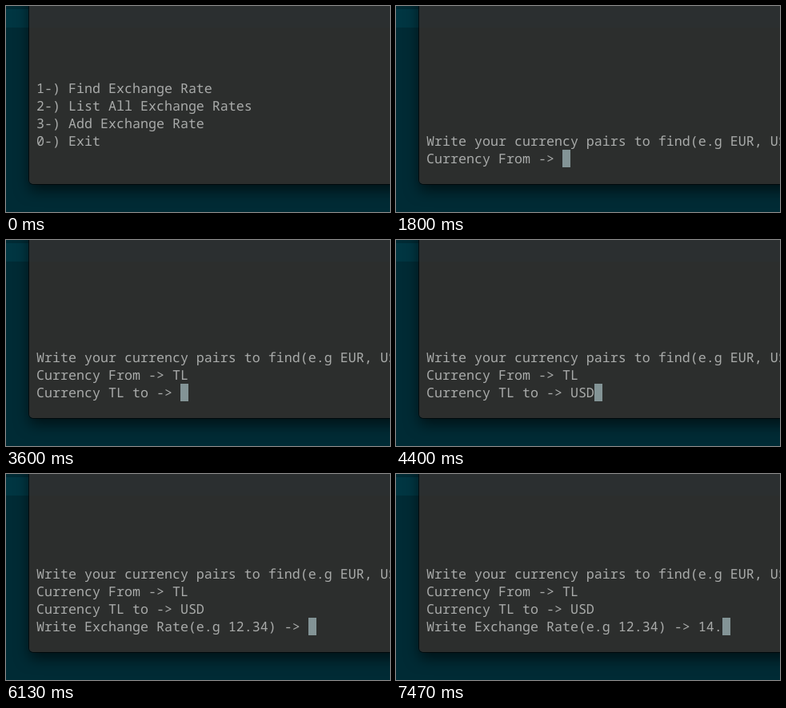
An HTML page that plays this animation: 480x258 px, repeating every 8 s.

```html
<!DOCTYPE html>
<html lang="en">
<head>
<meta charset="utf-8">
<title>Exchange rate terminal</title>
<style>
  html, body { margin: 0; width: 100%; height: 100%; overflow: hidden; background: #002b35; }
  #stage { position: relative; width: 480px; height: 258px; overflow: hidden; background: #002b35; }
  #band { position: absolute; left: 0; top: 4px; width: 480px; height: 23px; background: #003642; }
  #win {
    position: absolute; left: 29px; top: -40px; width: 520px; height: 263px;
    border-radius: 0 0 5px 5px;
    background: linear-gradient(#2b2f30 67px, #2c2e2d 67px);
    box-shadow: 0 0 0 1px rgba(0, 0, 0, .6), 0 8px 18px rgba(0, 0, 0, .6);
  }
  svg { position: absolute; left: 0; top: 0; }
  text {
    font: 16.6667px "Roboto Mono", "Noto Sans Mono", "DejaVu Sans Mono", monospace;
    font-variant-ligatures: none; text-rendering: geometricPrecision;
    white-space: pre; fill: #a9abaa;
  }
</style>
</head>
<body>
<div id="stage">
  <div id="band"></div>
  <div id="win"></div>
  <svg width="480" height="258" viewBox="0 0 480 258">
    <g id="rows"></g>
    <rect id="cursor" y="180" width="10" height="22" fill="#839496"/>
  </svg>
</div>
<script>
const LOOP = 8000, LEFT = 38, CELL = 10, LINE = 22, BASE = 197, ROWS = 5;

const menu = ["1-) Find Exchange Rate", "2-) List All Exchange Rates", "3-) Add Exchange Rate", "0-) Exit"];
const from = ["Write your currency pairs to find(e.g EUR, USD)"];
const to = [...from, "Currency From -> TL"];
const rate = [...to, "Currency TL to -> USD"];
const askFrom = "Currency From -> ", askTo = "Currency TL to -> ", askRate = "Write Exchange Rate(e.g 12.34) -> ";

// [start ms, lines above, prompt line, cursor shown]
const steps = [
  [0, menu, "", false],
  [530, menu, "", true],
  [1070, menu, "3", true],
  [1600, menu, "3", false],
  [1800, from, askFrom, true],
  [2400, from, askFrom, false],
  [2930, from, askFrom, true],
  [3130, from, askFrom + "T", true],
  [3330, from, askFrom + "TL", true],
  [3600, to, askTo, true],
  [4130, to, askTo + "U", true],
  [4270, to, askTo + "US", true],
  [4400, to, askTo + "USD", true],
  [4930, rate, askRate, true],
  [5530, rate, askRate, false],
  [6130, rate, askRate, true],
  [6330, rate, askRate + "1", true],
  [6530, rate, askRate + "14", true],
  [6930, rate, askRate + "14,", true],
  [7270, rate, askRate + "14", true],
  [7470, rate, askRate + "14.", true]
];

const cursor = document.getElementById("cursor");
const rows = Array.from({ length: ROWS }, (_, i) => {
  const row = document.createElementNS("http://www.w3.org/2000/svg", "text");
  row.setAttribute("x", LEFT);
  row.setAttribute("y", BASE - (ROWS - 1 - i) * LINE);
  return document.getElementById("rows").appendChild(row);
});

let shown = null;
function draw(time) {
  const t = time % LOOP;
  const step = steps.findLast(s => s[0] <= t) || steps[0];
  if (step === shown) return;
  shown = step;
  const [, above, prompt, on] = step;
  const lines = [...above, prompt];
  rows.forEach((row, i) => { row.textContent = lines[i - ROWS + lines.length] || ""; });
  cursor.setAttribute("x", LEFT + prompt.length * CELL);
  cursor.setAttribute("visibility", on ? "visible" : "hidden");
}

const start = performance.now();
function tick() {
  draw(performance.now() - start);
  requestAnimationFrame(tick);
}
draw(0);
requestAnimationFrame(tick);
</script>
</body>
</html>
```
